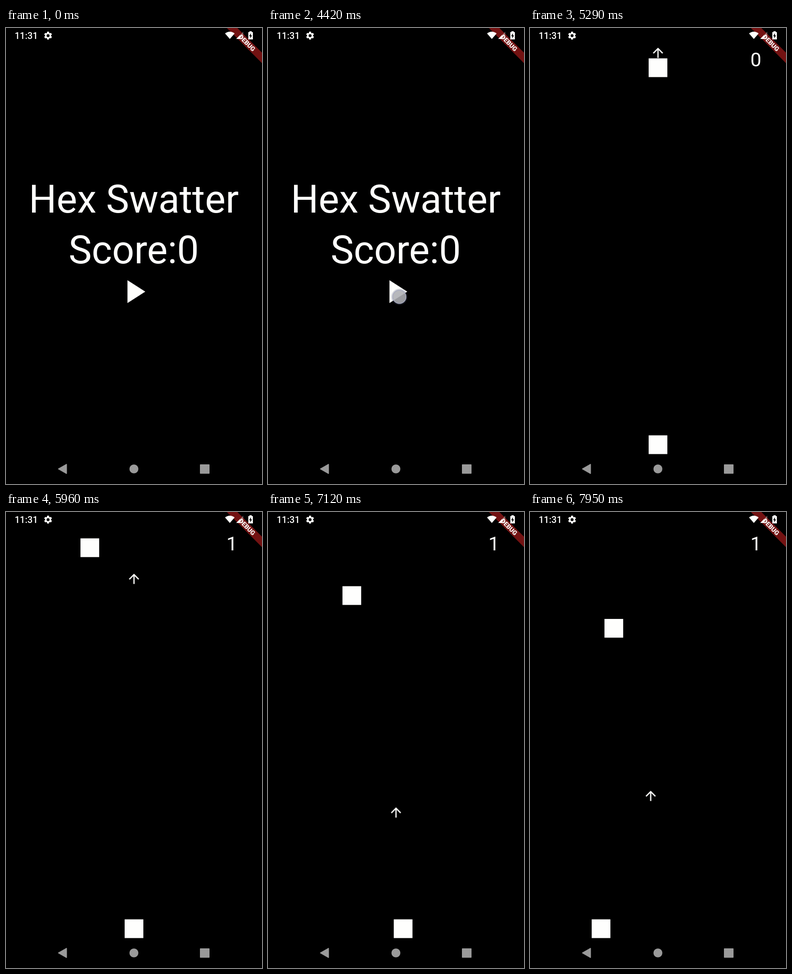
Write an HTML page that moves like this. It is 561 px wide and 998 px high and loops after 7.99 s.

```html
<!DOCTYPE html>
<html lang="en">
<head>
<meta charset="utf-8">
<title>Hex Swatter</title>
<style>
  html, body { margin: 0; width: 100%; height: 100%; overflow: hidden; background: #000; }
  svg { display: block; width: 100vw; height: 100vh; font-family: Roboto, sans-serif; fill: #fffffd; }
  .mid { text-anchor: middle; }
  .title { font-size: 85.2px; }
  .score { font-size: 42.6px; }
  .clock { font-size: 20px; font-weight: 500; }
  .debug { font-size: 13.9px; font-weight: 900; }
  .nav { fill: #9a9a9a; stroke: #9a9a9a; stroke-width: 2; stroke-linejoin: round; }

  .menu, .game, .touch, .zero, .one, .enemy, .arrow, .player {
    animation: 7990ms step-end infinite;
  }
  .menu { animation-name: menu; }
  .game { animation-name: game; }
  .touch { animation-name: touch; }
  .zero { animation-name: zero; }
  .one { animation-name: one; }
  .enemy { animation-name: enemy; animation-timing-function: linear; }
  .arrow { animation-name: arrow; }
  .player { animation-name: player; animation-timing-function: linear; }

  @keyframes menu { 0% { visibility: visible } 56.82%, 100% { visibility: hidden } }
  @keyframes game { 0% { opacity: 0 } 56.82%, 100% { opacity: 1 } }
  @keyframes touch {
    0% { visibility: hidden }
    55.31% { visibility: visible }
    56.82%, 100% { visibility: hidden }
  }
  @keyframes zero { 0% { visibility: visible } 66.7%, 100% { visibility: hidden } }
  @keyframes one { 0% { visibility: hidden } 66.7%, 100% { visibility: visible } }

  /* Falls steadily; a hit respawns it at the top in another column */
  @keyframes enemy {
    0%, 56.82% { transform: translate(260px, 0) }
    66.2% { transform: translate(260px, 66.3px) }
    66.69% { transform: translate(260px, 69.8px); animation-timing-function: step-end }
    66.7% { transform: translate(163.2px, 0) }
    83.72% { transform: translate(163.2px, 124.2px) }
    93.99% { transform: translate(163.2px, 196.8px) }
    99.49%, 100% { transform: translate(163.2px, 234px) }
  }

  /* Each flight climbs in display-rate steps, then restarts at the player */
  @keyframes arrow {
    0% { transform: translate(280.5px, 863px) }
    56.82% { transform: translate(280.5px, 863px); animation-timing-function: steps(18) }
    66.2% { transform: translate(280.5px, 43px) }
    66.7% { transform: translate(280.5px, 825px); animation-timing-function: steps(17) }
    75.59% { transform: translate(280.5px, 43px) }
    76.21% { transform: translate(280.5px, 863px); animation-timing-function: steps(15) }
    83.72% { transform: translate(280.5px, 219px); animation-timing-function: steps(4) }
    85.98% { transform: translate(280.5px, 43px) }
    86.98% { transform: translate(280.5px, 825px); animation-timing-function: steps(14) }
    93.99% { transform: translate(280.5px, 199.7px); animation-timing-function: steps(4) }
    95.99% { transform: translate(280.5px, 23px) }
    96.49% { transform: translate(264.5px, 863px); animation-timing-function: steps(6) }
    99.49%, 100% { transform: translate(264.5px, 610px) }
  }

  @keyframes player {
    0% { transform: translate(260px, 891.5px) }
    87.5% { transform: translate(260px, 891.5px); animation-timing-function: ease-in-out }
    92.74% { transform: translate(338px, 891.5px); animation-timing-function: cubic-bezier(.333, 0, .667, .333) }
    96.55% { transform: translate(245px, 891.5px) }
    99.49%, 100% { transform: translate(135.2px, 891.5px) }
  }
</style>
</head>
<body>
<svg viewBox="0 0 561 998" preserveAspectRatio="none">
  <defs>
    <radialGradient id="halo">
      <stop offset=".7" stop-color="#5a6080" stop-opacity=".55"/>
      <stop offset="1" stop-color="#404660" stop-opacity="0"/>
    </radialGradient>
    <rect id="box" width="41" height="41" fill="#fefefd"/>
  </defs>
  <rect width="561" height="998" fill="#000"/>

  <g class="menu">
    <text class="title mid" x="280" y="404.2">Hex Swatter</text>
    <text class="title mid" x="280" y="515.2">Score:0</text>
    <path d="M266.2 552v50l39-25z"/>
  </g>
  <g class="touch">
    <circle cx="288" cy="588.5" r="19" fill="url(#halo)"/>
    <circle cx="288" cy="588.5" r="14.5" fill="#bebebe" fill-opacity=".75" stroke="#a8abc0" stroke-width="1.5"/>
  </g>

  <g class="game">
    <use class="enemy" href="#box"/>
    <use class="player" href="#box"/>
    <g class="arrow">
      <path transform="scale(1.4) translate(-12 -4)"
        d="M4 12l1.41 1.41L11 7.83V20h2V7.83l5.58 5.59L20 12l-8-8z"/>
    </g>
    <text class="score mid zero" x="495" y="83.5">0</text>
    <text class="score mid one" x="495" y="83.5">1</text>
  </g>

  <path d="M484 0h23l54 54v23z" fill="#731212"/>
  <text class="debug mid" transform="translate(528.3 32.7) rotate(45)" y="5">DEBUG</text>

  <text class="clock" x="19" y="24">11:31</text>
  <path transform="translate(81.4 5.9) scale(.9)" fill-rule="evenodd"
    d="M19.14 12.94c.04-.3.06-.61.06-.94 0-.32-.02-.64-.07-.94l2.03-1.58c.18-.14.23-.41.12-.61l-1.92-3.32c-.12-.22-.37-.29-.59-.22l-2.39.96c-.5-.38-1.03-.7-1.62-.94l-.36-2.54c-.04-.24-.24-.41-.48-.41h-3.84c-.24 0-.43.17-.47.41l-.36 2.54c-.59.24-1.13.57-1.62.94l-2.39-.96c-.22-.08-.47 0-.59.22L2.74 8.87c-.12.21-.08.47.12.61l2.03 1.58c-.05.3-.09.63-.09.94s.02.64.07.94l-2.03 1.58c-.18.14-.23.41-.12.61l1.92 3.32c.12.22.37.29.59.22l2.39-.96c.5.38 1.03.7 1.62.94l.36 2.54c.05.24.24.41.48.41h3.84c.24 0 .44-.17.47-.41l.36-2.54c.59-.24 1.13-.56 1.62-.94l2.39.96c.22.08.47 0 .59-.22l1.92-3.32c.12-.22.07-.47-.12-.61zM12 15.6a3.6 3.6 0 1 1 0-7.2 3.6 3.6 0 0 1 0 7.2z"/>
  <path d="M490.5 24L480 12Q490.5 4 501 12z"/>
  <path d="M504.5 24H520V8z" opacity=".35"/>
  <path d="M504.5 24h9v-9.3z"/>
  <path fill-rule="evenodd" d="M533.5 7h5v2h2.500v16h-10V9h2.500zM536.800 11.500l-4 6.200h2.400v4.800l4-6.300h-2.400z"/>

  <path class="nav" d="M115 965l17.500-10v20z"/>
  <circle cx="280.300" cy="965" r="9.800" fill="#9a9a9a"/>
  <rect class="nav" x="426" y="956" width="19" height="18.500"/>
</svg>
</body>
</html>
```
